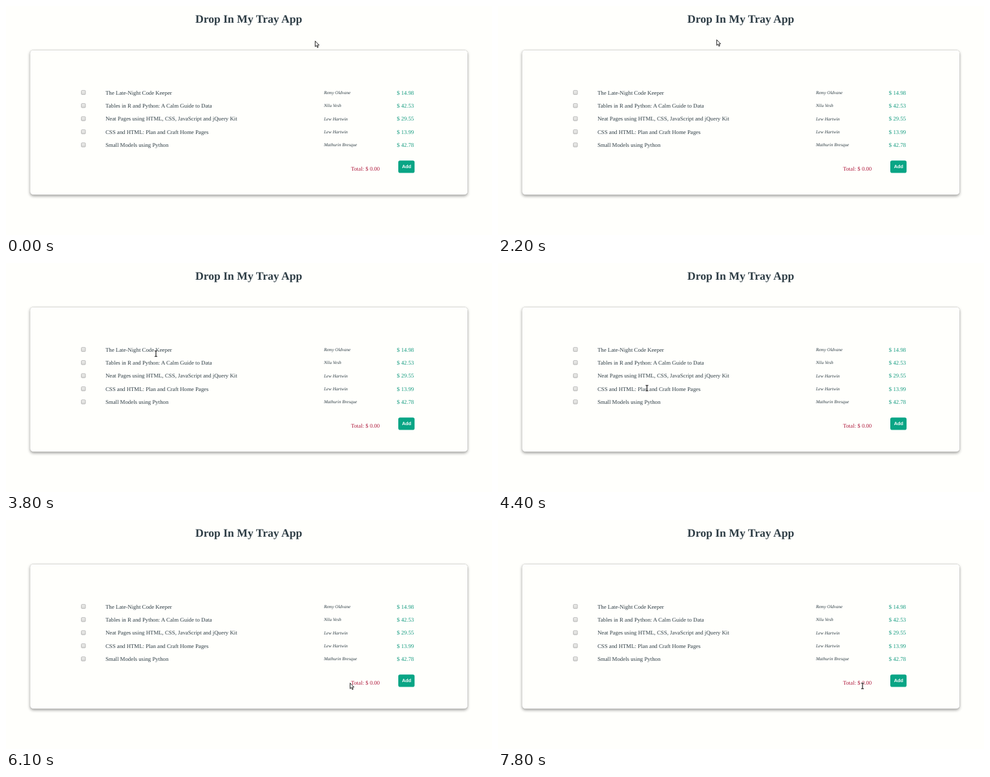
Recreate the animation shown at these times as an HTML page. Size 752 by 356 pixels, loop 8 s.

```html
<!DOCTYPE html>
<html lang="en">
<head>
<meta charset="utf-8">
<title>Drop In My Tray App</title>
<style>
  html, body { margin: 0; width: 100%; height: 100%; overflow: hidden; background: #fffffc; }
  svg { display: block; width: 100%; height: 100%; }
  text { font: 8.81px "Liberation Serif", serif; fill: #2f3e46; text-rendering: geometricPrecision; }
  .title { font-size: 17.62px; font-weight: bold; text-anchor: middle; }
  .author { font-size: 7.05px; font-style: italic; }
  .price { fill: #169c80; }
  .total { fill: #b01f40; }
  .label { font: bold 7.34px "Liberation Sans", sans-serif; fill: #fff; text-anchor: middle; }
  .card { fill: #fffffc; filter: drop-shadow(0 0 .6px rgba(0,0,0,.45)) drop-shadow(0 2px 2px rgba(0,0,0,.38)); }
  .box { fill: url(#grey); stroke: #a3a3a3; stroke-width: .7; }
  .halo { fill: none; stroke: #fff; stroke-width: 2; }
  .beam { fill: none; stroke: #111; stroke-width: 1.1; }
  .arrow { fill: #fff; stroke: #111; stroke-width: .9; stroke-linejoin: round; }
</style>
</head>
<body>
<svg viewBox="0 0 752 356">
  <defs>
    <linearGradient id="grey" x2="0" y2="1">
      <stop offset="0" stop-color="#eeeeec"/>
      <stop offset="1" stop-color="#d9d9d7"/>
    </linearGradient>
  </defs>
  <text class="title" x="375.7" y="25.5">Drop In My Tray App</text>
  <rect class="card" x="37.2" y="68.4" width="677" height="225" rx="5"/>
  <g id="rows"></g>
  <text class="total" x="533.7" y="256.3">Total: $ 0.00</text>
  <rect x="607" y="240.2" width="25.2" height="19.4" rx="2.8" fill="#09a585"/>
  <text class="label" x="619.8" y="252.4">Add</text>
  <g id="cursor">
    <path id="arrow" class="arrow" d="M.4.5V9.2L2.4 7.4L3.8 10.6L5.2 10L3.8 6.9H6.5Z"/>
    <g id="beam">
      <path class="halo" d="M-2.4-4.2H2.4M0-4.8V4.8M-2.4 4.2H2.4"/>
      <path class="beam" d="M-2.1-4.2H2.1M0-4.2V4.2M-2.1 4.2H2.1"/>
    </g>
  </g>
</svg>
<script>
const LOOP = 8000, STEP = 100;
const $ = id => document.getElementById(id);

const books = [
  ["The Late-Night Code Keeper", "Remy Oldvane", "14.98"],
  ["Tables in R and Python: A Calm Guide to Data", "Nilu Vesh", "42.53"],
  ["Neat Pages using HTML, CSS, JavaScript and jQuery Kit", "Lew Hartwin", "29.55"],
  ["CSS and HTML: Plan and Craft Home Pages", "Lew Hartwin", "13.99"],
  ["Small Models using Python", "Mathurin Bresque", "42.78"]
];

function add(tag, attrs, text = "") {
  const el = document.createElementNS($("rows").namespaceURI, tag);
  for (const name in attrs) el.setAttribute(name, attrs[name]);
  el.textContent = text;
  $("rows").append(el);
}

books.forEach(([name, author, price], i) => {
  const y = 137.7 + i * 20.37;
  add("rect", { class: "box", x: 116.6, y: y - 6.4, width: 6.3, height: 6.3, rx: 1.1 });
  add("text", { x: 153.9, y }, name);
  add("text", { class: "author", x: 491.9, y: y - .9 }, author);
  add("text", { class: "price", x: 604.8, y }, "$ " + price);
});

// Pointer path: time, x, y, shape from that time on
const A = "arrow", I = "beam";
const path = [
  [0, 478, 54, A], [600, 478, 54, A], [800, 470, 54, A], [1100, 442, 54, A],
  [1300, 410, 52, A], [1500, 377, 50, A], [1600, 377, 50, A], [1900, 358, 50, A],
  [2200, 338, 52, A], [2300, 258, 104, A], [2400, 157, 185, A], [2500, 362, 128, A],
  [3000, 362, 128, A], [3300, 318, 131, A], [3500, 258, 137, I], [3700, 235, 139, I],
  [3800, 232, 141, I], [3900, 232, 153, I], [4300, 230, 187, I], [4700, 232, 217, I],
  [5000, 232, 217, I], [5100, 232, 215, I], [5200, 262, 219, A], [5400, 408, 238, A],
  [5600, 520, 250, A], [5700, 534, 252, A], [6000, 534, 252, A], [6100, 532, 253, A],
  [6300, 526, 253, A], [6500, 540, 254, I], [6800, 573, 254, I], [6900, 580, 253, A],
  [7100, 584, 253, A], [7400, 584, 253, A], [7500, 578, 255, I], [7800, 564, 258, I],
  [LOOP, 564, 258, I]
];

function pose(t) {
  const n = path.findIndex(p => p[0] > t);
  const [t0, x0, y0, shape] = path[n - 1];
  const [t1, x1, y1] = path[n];
  const k = (t - t0) / (t1 - t0);
  return { x: x0 + (x1 - x0) * k, y: y0 + (y1 - y0) * k, shape };
}

const start = performance.now();
function draw() {
  const t = (performance.now() - start) % LOOP;
  const { x, y, shape } = pose(Math.floor(t / STEP) * STEP);
  $("cursor").setAttribute("transform", `translate(${x} ${y})`);
  $(A).style.display = shape === A ? "" : "none";
  $(I).style.display = shape === I ? "" : "none";
  requestAnimationFrame(draw);
}
draw();
</script>
</body>
</html>
```
